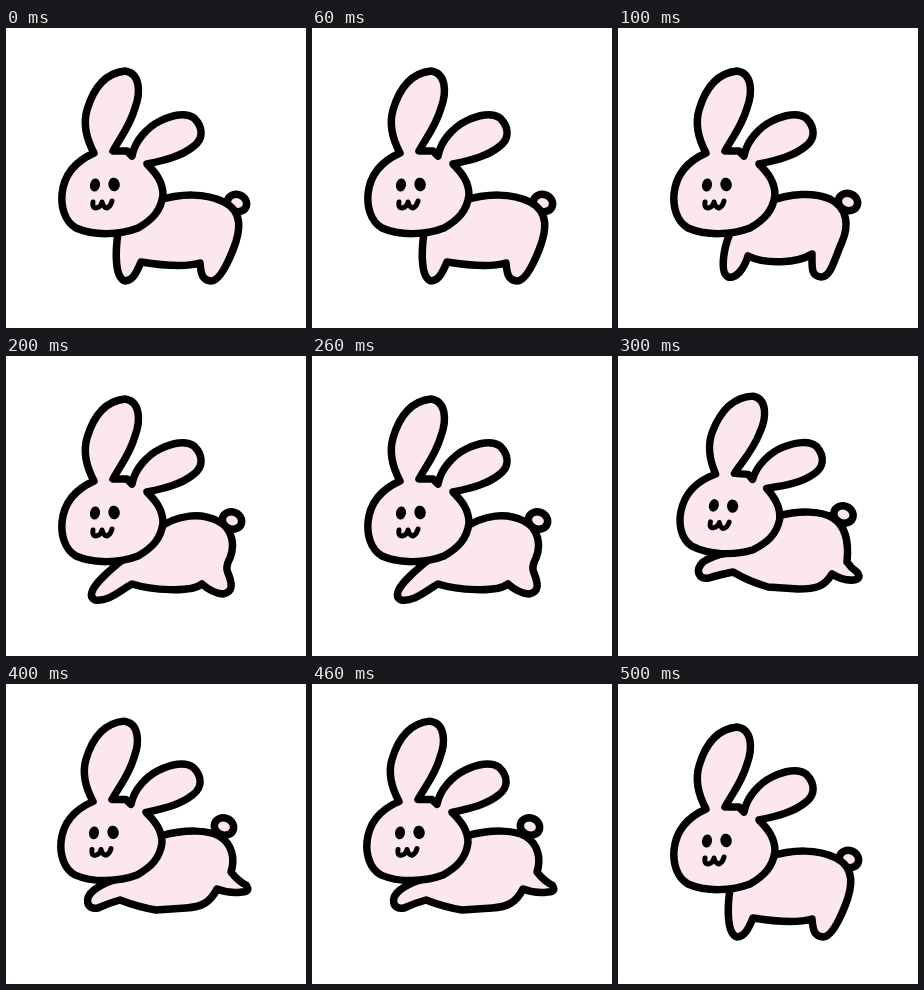
Animation of 300 by 300 pixels, one loop 0.6 s. Source, as an HTML page:

```html
<!DOCTYPE html>
<html lang="en">
<head>
<meta charset="utf-8">
<title>Hopping rabbit</title>
<style>
  html, body { margin: 0; width: 100%; height: 100%; overflow: hidden; background: #fff; }
  svg { display: block; width: 100%; height: 100%; }
  .line { fill: #fce6ef; stroke: #000; stroke-width: 7.5; stroke-linecap: round; stroke-linejoin: round; }
  #mouth { fill: none; stroke-width: 5; }
</style>
</head>
<body>
<svg viewBox="0 0 300 300">
  <ellipse id="tail" class="line" rx="9.8" ry="8.5"/>
  <path id="body" class="line"/>
  <g id="head">
    <path class="line" d="M88 125C80 110 77 96 81 82C88 58 100 45 119 43C134 45 135 64 129 80C124 98 114 110 107 123L121 123L126 128C129 112 142 99 154 93C166 87 180 84 188 90C198 100 197 111 188 118C176 128 160 132 141 136C150 145 157 154 157 167C155 183 146 192 132 200C114 207 88 208 70 200C58 193 55 178 56 166C58 146 70 133 88 125Z"/>
    <ellipse cx="89" cy="157" rx="5" ry="6.5" transform="rotate(10 89 157)"/>
    <ellipse cx="108" cy="156.5" rx="5.7" ry="6.8" transform="rotate(-10 108 156)"/>
    <path id="mouth" class="line" d="M87 174Q86 180 90 180Q95 179 96 174Q98 180 101 180Q105 178 106 173"/>
  </g>
</svg>
<script>
const $ = id => document.getElementById(id);
const STEP = 100;

const pose = (body, x, y, head = 'matrix(1 0 0 1 0 0)') => ({ body, x, y, head });

const stand = pose('M150 173C175 165 200 165 218 174C237 184 235 202 227 222C221 237 213 253 205 253C196 252 195 246 194 235C180 239 160 238 135 234C130 246 126 253 119 253C109 250 109 225 112 205', 231, 175);

const crouch = pose('M150 174C172 165 196 164 212 171C230 180 231 198 224 214C216 232 213 249 203 249C193 248 194 240 194 226C180 235 148 237 130 228C126 241 118 251 110 249C102 245 105 222 112 205', 230, 174);

const push = pose('M150 174C172 157 196 157 212 165C227 172 229 190 224 202Q219 211 222 217C226 227 228 236 217 238Q206 237 196 228C185 237 145 234 126 228C112 236 102 246 89 244C81 240 88 230 96 222Q108 210 118 203', 226, 164.5);

const stretch = pose('M160 160C182 154 204 155 215 162C228 170 231 186 229 206Q233 212 239 216Q244 223 236 224Q225 225 214 218C206 231 198 233 180 233L150 231Q130 225 115 216Q100 219 91 222C80 224 77 214 85 206Q94 200 108 197', 225.5, 158.5, 'matrix(.98 .065 -.085 .975 22 -9.5)');

const glide = pose('M154 152C180 145 202 146 213 152C227 160 229 176 225 188Q232 197 240 201Q245 208 236 208Q224 210 211 205C204 219 195 223 180 224L150 226Q132 223 114 216Q103 219 92 224C80 226 78 214 88 206Q96 200 108 196', 218, 142.5, 'matrix(1 0 0 .98 -1 -5)');

const hop = [stand, crouch, push, stretch, glide, stand];

function draw() {
  const p = hop[Math.floor(performance.now() / STEP) % hop.length];
  $('body').setAttribute('d', p.body);
  $('head').setAttribute('transform', p.head);
  $('tail').setAttribute('transform', `translate(${p.x} ${p.y}) rotate(20)`);
  requestAnimationFrame(draw);
}
draw();
</script>
</body>
</html>
```
